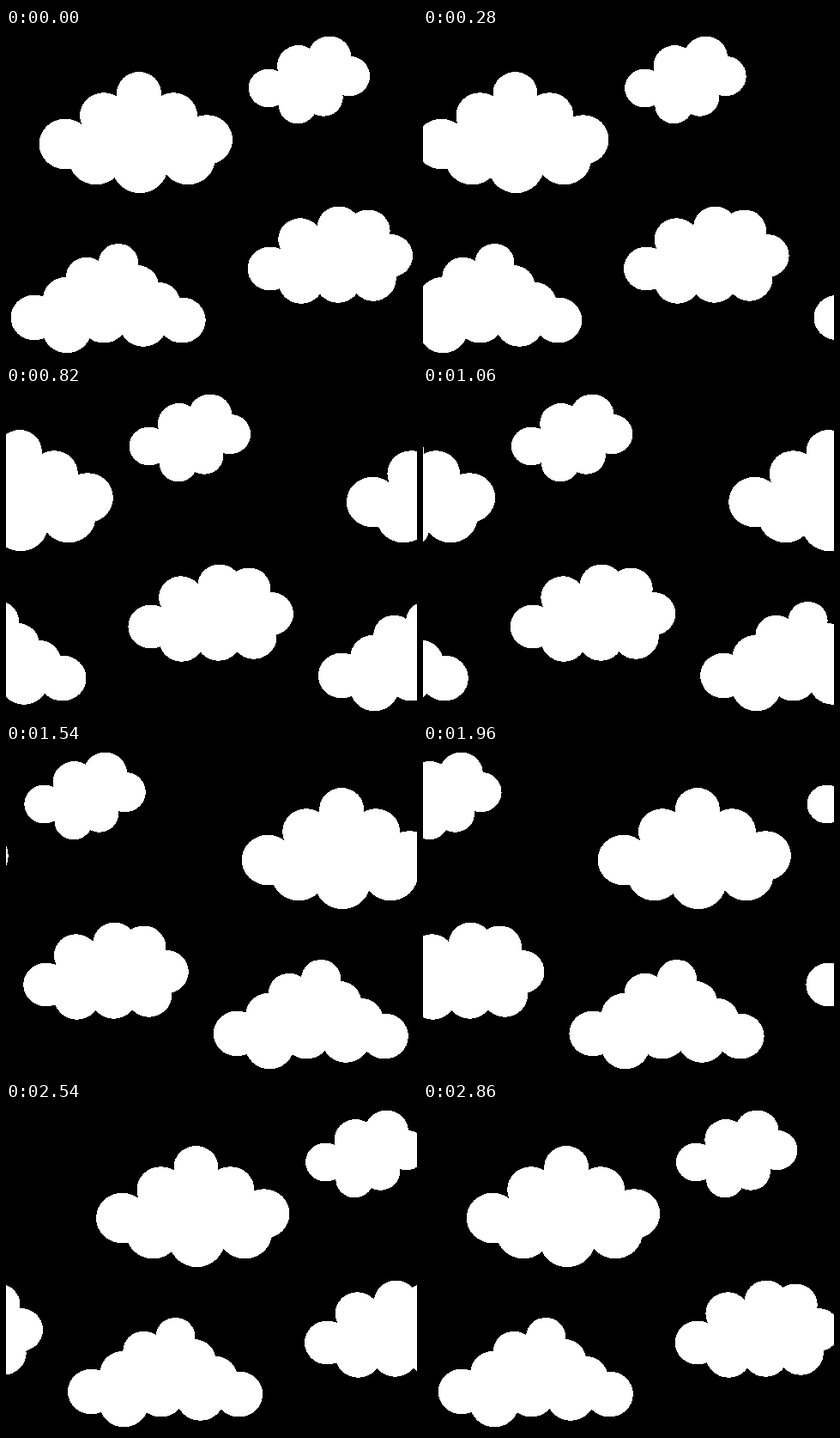
Animation of 479x384 px, one loop 2880 ms. Source, as an HTML page with a canvas:

```html
<!DOCTYPE html>
<html lang="en">
<head>
<meta charset="utf-8">
<title>Drifting clouds</title>
<style>
html, body { margin: 0; width: 100%; height: 100%; overflow: hidden; background: #000; }
canvas { display: block; width: 479px; height: 384px; }
</style>
</head>
<body>
<canvas id="sky" width="479" height="384"></canvas>
<script>
const W = 479, H = 384;
const LOOP = 2880, STEP = 20;
const SHIFT = 3.394;  // pixels per step
const WRAP = 497.5;   // width of the repeating strip
const SQUASH = 0.96;  // puffs are slightly wider than tall

const ctx = document.getElementById('sky').getContext('2d', { alpha: false, willReadFrequently: true });

// A ring of puffs around a filled core. The highest puff has radius r,
// and the others grow by a fixed rate with their distance below it.
function makeCloud(r, growth, centres) {
  const top = Math.min(...centres.map(c => c[1]));
  const path = new Path2D();
  for (const [x, y] of centres) path.lineTo(x, y);
  path.closePath();
  for (const [x, y] of centres) {
    const rx = r + growth * (y - top);
    const puff = new Path2D();
    puff.ellipse(x, y, rx, rx * SQUASH, 0, 0, Math.PI * 2);
    path.addPath(puff);
  }
  return path;
}

// Puff centres run clockwise from the left end
const clouds = [
  makeCloud(26, 0.075, [[69, 135], [114, 102], [155, 76], [195, 102], [234, 130], [212, 152], [156, 161], [105, 152]]),
  makeCloud(25.5, -0.06, [[306, 70], [341, 44], [377, 34], [400, 56], [370, 81], [340, 90]]),
  makeCloud(23, 0.07, [[33, 337], [69, 315], [94, 290], [131, 273], [153, 300], [177, 321], [205, 340], [160, 344], [114, 340], [71, 351]]),
  makeCloud(25.5, 0.02, [[308, 280], [343, 246], [388, 232], [422, 236], [448, 265], [428, 292], [387, 294], [344, 295]])
];

// Turns soft edges into crisp black and white
function sharpen() {
  const img = ctx.getImageData(0, 0, W, H);
  const px = img.data;
  for (let i = 0; i < px.length; i += 4) {
    px[i] = px[i + 1] = px[i + 2] = px[i] > 127 ? 255 : 0;
  }
  ctx.putImageData(img, 0, 0);
}

function draw(step) {
  ctx.setTransform(1, 0, 0, 1, 0, 0);
  ctx.fillStyle = '#000';
  ctx.fillRect(0, 0, W, H);
  ctx.fillStyle = '#fff';
  const x = -step * SHIFT;
  for (const dx of [x, x + WRAP]) {
    ctx.setTransform(1, 0, 0, 1, dx, 0);
    for (const cloud of clouds) ctx.fill(cloud);
  }
  sharpen();
}

const start = performance.now();
let last = -1;

function tick() {
  const t = Math.max(0, performance.now() - start) % LOOP;
  const step = Math.floor(t / STEP);
  if (step !== last) draw(last = step);
  requestAnimationFrame(tick);
}
tick();
</script>
</body>
</html>
```
